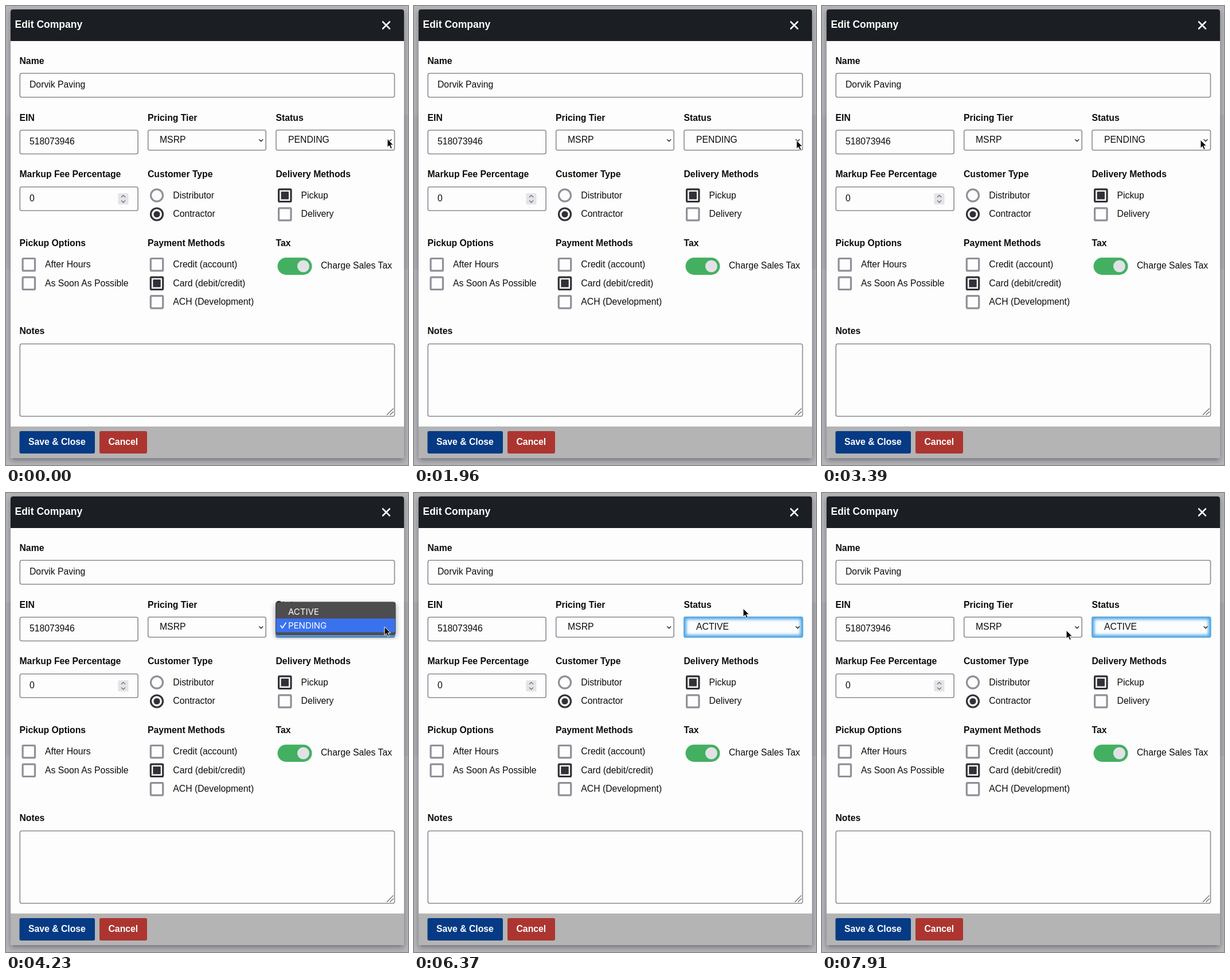
An HTML page for the animation above (8000 ms loop, 701 by 799 pixels).

```html
<!DOCTYPE html>
<html lang="en">
<head>
<meta charset="utf-8">
<title>Edit form</title>
<style>
  html, body { margin: 0; width: 100%; height: 100%; overflow: hidden; background: #b0b0b2; }
  svg { display: block; width: 100%; height: 100%; }
  text { font: 15.75px "Liberation Sans", Arial, sans-serif; fill: #0c0c0e; }
  .bold { font-weight: 700; }
  .title { font-size: 17.5px; }
  .white { fill: #fff; }
  .menu { font: 15px Inter, sans-serif; fill: #fff; }
  .box { fill: #fdfdfd; stroke: #8b8b92; stroke-width: 1.6; }
  .mark { fill: #fdfdfd; stroke: #908f99; stroke-width: 3.2; }
  .mark.on { stroke: #313138; }
  .dot { fill: #313138; }
  .line { fill: none; stroke: #222; stroke-width: 1.4; stroke-linecap: round; stroke-linejoin: round; }
</style>
</head>
<body>
<svg viewBox="0 0 701 799" preserveAspectRatio="none">
  <defs>
    <filter id="shadow" x="-10%" y="-10%" width="120%" height="125%">
      <feDropShadow dx="0" dy="4" stdDeviation="5" flood-color="#222238" flood-opacity=".45"/>
    </filter>
    <filter id="blur" x="-10%" y="-40%" width="120%" height="180%"><feGaussianBlur stdDeviation="2.6"/></filter>
    <clipPath id="statusBox"><rect x="470" y="215" width="208.5" height="37" rx="3"/></clipPath>
  </defs>

  <rect width="701" height="799" fill="#b6b6b8"/>
  <rect y="190" width="701" height="268" fill="#aeaeb0"/>
  <rect x="8" y="6" width="686" height="781" rx="4" fill="#fdfdfd" filter="url(#shadow)"/>
  <path d="M8 61V10a4 4 0 0 1 4-4H690a4 4 0 0 1 4 4V61Z" fill="#1b1e23"/>
  <path d="M8 732H694V783a4 4 0 0 1-4 4H12a4 4 0 0 1-4-4Z" fill="#b4b4b4"/>
  <path d="M657 27.5l12 12m0-12l-12 12" stroke="#fff" stroke-width="2.5" stroke-linecap="round"/>
  <rect x="23.5" y="740" width="131.5" height="39" rx="3" fill="#063a84"/>
  <rect x="163" y="740" width="83" height="39" rx="3" fill="#ad3530"/>

  <g id="form"></g>

  <g id="focus">
    <g clip-path="url(#statusBox)">
      <rect x="471" y="216" width="206.5" height="35" rx="3" fill="none" stroke="#4ba9ee" stroke-width="8" filter="url(#blur)"/>
    </g>
    <rect x="471" y="216" width="206.5" height="35" rx="3" fill="none" stroke="#69a9d8" stroke-width="1.6"/>
  </g>
  <g id="status">
    <text id="statusText" x="492" y="238"></text>
    <path class="line" d="M666 232.5l3 3 3-3"/>
  </g>

  <g id="menu">
    <rect x="470.5" y="190" width="208.5" height="56.5" rx="3" fill="#4e4e4f" stroke="#3a3a3c" filter="url(#shadow)"/>
    <rect id="highlight" x="471" width="207.5" height="24" fill="#3a72ee"/>
    <text class="menu" x="492" y="212">ACTIVE</text>
    <text class="menu" x="492" y="235.5">PENDING</text>
    <path d="M479 231l3 4 6-9" fill="none" stroke="#fff" stroke-width="1.7" stroke-linecap="round"/>
  </g>

  <path id="cursor" d="M0 0V14.6L3.4 11.5 5.8 17 8.4 15.9 6 10.4H10.6Z" fill="#0a0a0a" stroke="#fff" stroke-width="1"/>
</svg>
<script>
const $ = id => document.getElementById(id);
const parts = [];

const text = (x, y, value, cls = '') => parts.push(`<text x="${x}" y="${y}" class="${cls}">${value}</text>`);
const label = (x, y, value) => text(x, y, value, 'bold');
const box = (x, y, w, h) => parts.push(`<rect class="box" x="${x}" y="${y}" width="${w}" height="${h}" rx="3"/>`);
const line = d => parts.push(`<path class="line" d="${d}"/>`);

function square(cx, cy, caption, on) {
  parts.push(`<rect class="mark ${on ? 'on' : ''}" x="${cx - 10.7}" y="${cy - 10.7}" width="21.4" height="21.4" rx="1.5"/>`);
  if (on) parts.push(`<rect class="dot" x="${cx - 6.7}" y="${cy - 6.7}" width="13.4" height="13.4"/>`);
  text(cx + 28.3, cy + 4.8, caption);
}

function radio(cx, cy, caption, on) {
  parts.push(`<circle class="mark ${on ? 'on' : ''}" cx="${cx}" cy="${cy}" r="10.5"/>`);
  if (on) parts.push(`<circle class="dot" cx="${cx}" cy="${cy}" r="5.6"/>`);
  text(cx + 28.3, cy + 4.8, caption);
}

text(15.5, 38, 'Edit Company', 'bold white title');
text(39, 763.5, 'Save &amp; Close', 'bold white');
text(178.5, 763.5, 'Cancel', 'bold white');

label(23.5, 100.7, 'Name');
box(24.3, 117.3, 653.2, 41.5);
text(41, 142, 'Dorvik Paving');

label(23.5, 199.5, 'EIN');
box(24.3, 216.3, 205.8, 41.2);
text(41, 241, '518073946');
label(247, 199.5, 'Pricing Tier');
box(247.7, 216, 205.5, 35);
text(268, 238, 'MSRP');
line('M441.7 232.5l3 3 3-3');
label(470.5, 199.5, 'Status');
box(471, 216, 206.5, 35);

label(23.5, 298.3, 'Markup Fee Percentage');
box(24.3, 315, 205.8, 41.2);
text(41, 340, '0');
parts.push('<rect x="195.5" y="326" width="18" height="19.5" rx="2" fill="#e4e3e7"/>');
parts.push('<path d="M201 333l3.5-3.5 3.5 3.5m0 5.5l-3.5 3.5-3.5-3.5" fill="none" stroke="#707076" stroke-width="1.3"/>');
label(247, 298.3, 'Customer Type');
radio(263, 329.7, 'Distributor');
radio(263, 362.5, 'Contractor', true);
label(470.5, 298.3, 'Delivery Methods');
square(486.3, 329.8, 'Pickup', true);
square(486.3, 362.5, 'Delivery');

label(23.5, 418.3, 'Pickup Options');
square(39.8, 450.2, 'After Hours');
square(39.8, 482.8, 'As Soon As Possible');
label(247, 418.3, 'Payment Methods');
square(263, 450.2, 'Credit (account)');
square(263, 482.8, 'Card (debit/credit)', true);
square(263, 515.4, 'ACH (Development)');
label(470.5, 418.3, 'Tax');
parts.push('<rect x="473.5" y="438" width="60" height="30" rx="15" fill="#43b061"/>');
parts.push('<circle cx="518.5" cy="453" r="10.5" fill="#e2e1e6"/>');
text(549, 457, 'Charge Sales Tax');

label(23.5, 571.3, 'Notes');
box(24.3, 588.2, 653.2, 126);
parts.push('<path d="M664 712l11.500-11.500M669.500 712l6-6" stroke="#66666c" stroke-width="1.1"/>');
$('form').innerHTML = parts.join('');

const LOOP = 8000, OPEN = 3400, CLOSE = 5950;
// Cursor stops: time, x, y
const stops = [
  [0, 665, 231.5], [350, 665, 231.5], [800, 667, 231.5], [1500, 667, 231.5], [2200, 667, 235],
  [2900, 667, 235], [3300, 660, 233], [4450, 660, 233], [5200, 574, 201],
  [6900, 574, 201], [7700, 426, 239], [LOOP, 426, 239]
];

function cursorAt(t) {
  const i = stops.findIndex(stop => stop[0] > t);
  const [t0, x0, y0] = stops[i - 1], [t1, x1, y1] = stops[i];
  const p = (t - t0) / (t1 - t0), ease = p * p * (3 - 2 * p);
  return [x0 + (x1 - x0) * ease, y0 + (y1 - y0) * ease];
}

const show = (id, on) => $(id).setAttribute('visibility', on ? 'visible' : 'hidden');

function draw(t) {
  const [x, y] = cursorAt(t);
  $('cursor').setAttribute('transform', `translate(${x} ${y})`);
  show('menu', t >= OPEN && t < CLOSE);
  show('focus', t >= OPEN);
  $('highlight').setAttribute('y', y < 218 ? 194.5 : 218.5);
  $('statusText').textContent = t < CLOSE ? 'PENDING' : 'ACTIVE';
}

const start = performance.now();
function frame() {
  draw((performance.now() - start) % LOOP);
  requestAnimationFrame(frame);
}
frame();
</script>
</body>
</html>
```
